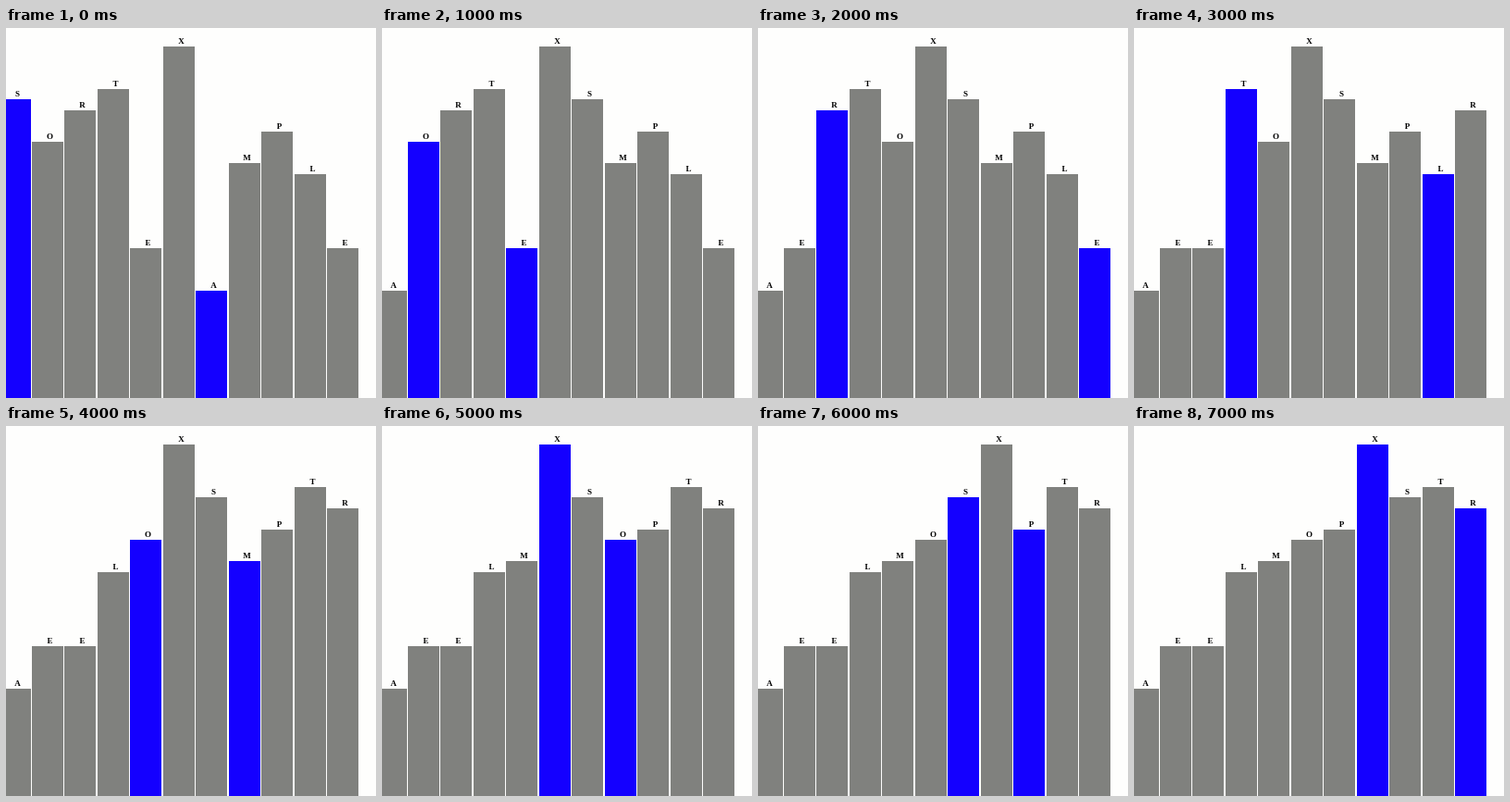
These frames come from a looping animation (400x400 px, 8000 ms). An HTML page:

```html
<!DOCTYPE html>
<html lang="en">
<head>
<meta charset="utf-8">
<title>Selection sort</title>
<style>
  html, body { margin: 0; width: 100%; height: 100%; overflow: hidden; background: #fefefd; }
  svg { display: block; width: 100vw; height: 100vh; }
  text { font: bold 9px "Liberation Serif", "Noto Serif", serif; text-anchor: middle; fill: #000; }
</style>
</head>
<body>
<svg id="stage" viewBox="0 0 400 400"></svg>
<script>
const WORD = "SORTEXAMPLE";
const STEP = 1000, STEPS = 8;
const GREY = "#80817e", BLUE = "#1400ff";
const stage = document.getElementById("stage");

function add(tag, attrs) {
  const el = document.createElementNS("http://www.w3.org/2000/svg", tag);
  for (const key in attrs) el.setAttribute(key, attrs[key]);
  return stage.appendChild(el);
}

// Each state keeps the row and the pair about to be swapped.
function selectionSort(word, count) {
  const row = [...word], states = [];
  for (let i = 0; i < count; i++) {
    let min = i;
    for (let j = i + 1; j < row.length; j++) if (row[j] < row[min]) min = j;
    states.push({ row: row.slice(), pair: [i, min] });
    [row[i], row[min]] = [row[min], row[i]];
  }
  return states;
}

const barLeft = i => Math.round(28 + (i - 1) * 390 / 11);
const barTop = ch => Math.round(284 - (ch.charCodeAt(0) - 65) * 264 / 23);

const states = selectionSort(WORD, STEPS);
const bars = [...WORD].map((_, i) => ({
  rect: add("rect", { x: barLeft(i), width: 34 }),
  label: add("text", { x: barLeft(i) + 19.5 })
}));

let shown = -1;
function draw(time) {
  const step = Math.floor(time / STEP) % STEPS;
  if (step === shown) return;
  shown = step;
  const { row, pair } = states[step];
  bars.forEach(({ rect, label }, i) => {
    const top = barTop(row[i]);
    rect.setAttribute("y", top);
    rect.setAttribute("height", 400 - top);
    rect.setAttribute("fill", pair.includes(i) ? BLUE : GREY);
    label.setAttribute("y", top - 3);
    label.textContent = row[i];
  });
}

const start = performance.now();
function tick() {
  draw(performance.now() - start);
  requestAnimationFrame(tick);
}
tick();
</script>
</body>
</html>
```
